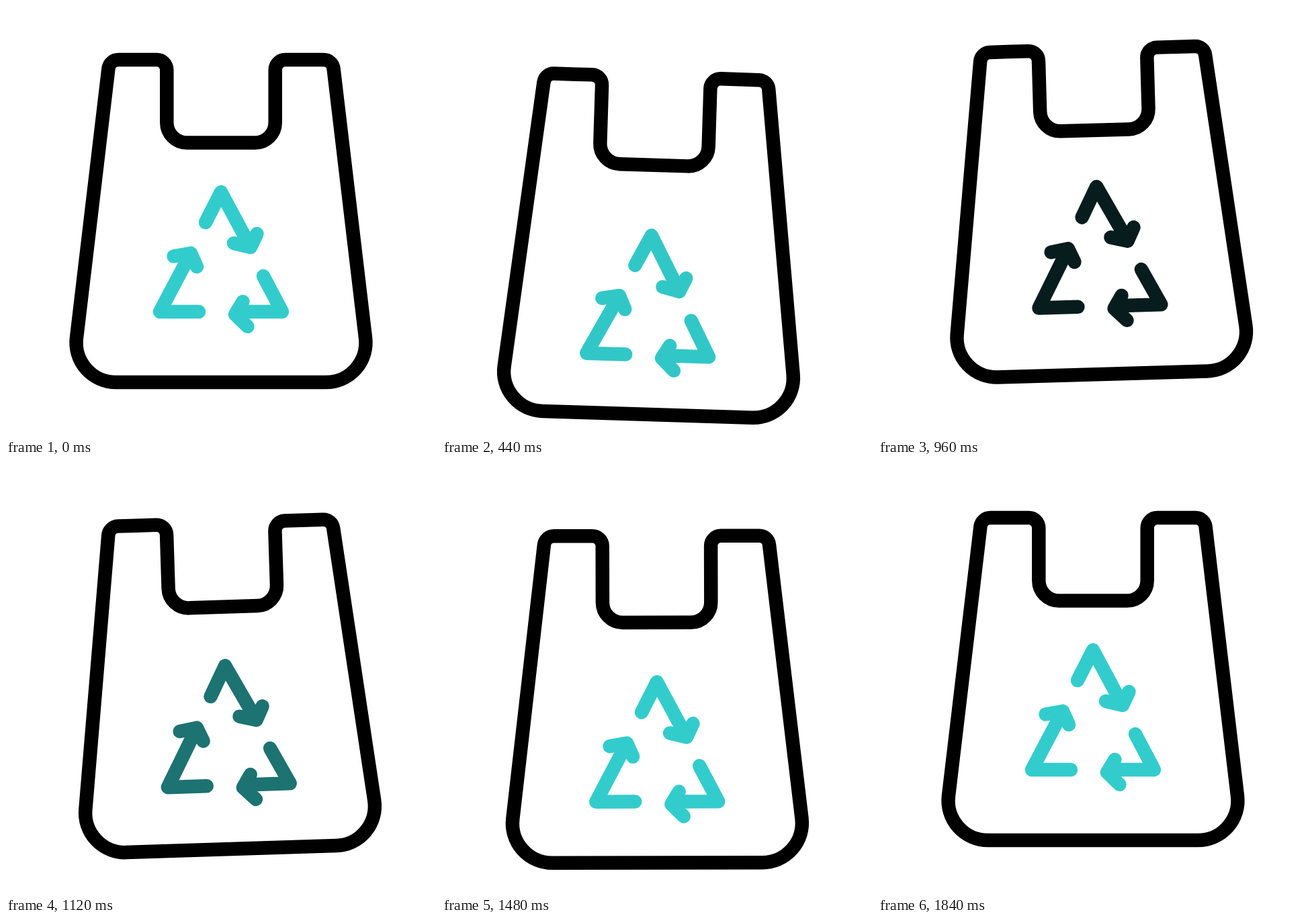
Recreate the animation shown at these times as an HTML page with a canvas. Size 640 by 640 pixels, loop 2000 ms.

```html
<!DOCTYPE html>
<html lang="en">
<head>
<meta charset="utf-8">
<title>Recyclable bag</title>
<style>
  html, body { margin: 0; width: 100%; height: 100%; overflow: hidden; background: #fff; }
  canvas { display: block; width: 100vw; height: 100vh; object-fit: contain; }
</style>
</head>
<body>
<canvas id="stage" width="640" height="640"></canvas>
<script>
const ctx = document.getElementById('stage').getContext('2d');
const LOOP = 2000, STEP = 40;
const PIVOT = { x: 320, y: 80 };

// Key times in ms
const BOUNCE = [80, 400, 840, 1360, 1840];
const SWAY = [80, 520, 1044, 1560];

// Eased value between keys, flat at every key
function track(t, times, values) {
  const last = times.length - 1;
  if (t <= times[0]) return values[0];
  if (t >= times[last]) return values[last];
  let i = 0;
  while (t >= times[i + 1]) i++;
  const u = (t - times[i]) / (times[i + 1] - times[i]);
  return values[i] + (values[i + 1] - values[i]) * u * u * (3 - 2 * u);
}

function pose(t) {
  return {
    drift: track(t, BOUNCE, [0, -0.8, -0.8, -0.7, 0]),
    drop: track(t, BOUNCE, [0, 26.5, -23, 32, 0]),
    handle: track(t, BOUNCE, [0, 8.3, -4.5, 6.5, 0]),
    base: track(t, BOUNCE, [0, 23.1, 3.2, 7.7, 0]),
    lean: track(t, BOUNCE, [0, 2.2, 1.3, 0, 0]),
    sign: track(t, BOUNCE, [0, 40.2, 5, 24.3, 0]),
    light: track(t, BOUNCE, [1, 1, 0, 1, 1]),
    angle: track(t, SWAY, [0, 1.97, -1.95, 0]) * Math.PI / 180
  };
}

function drawBag({ handle, base, lean }) {
  const mid = 203.5 + handle, low = 560 + base, foot = 494 + base;
  ctx.beginPath();
  ctx.moveTo(195, 80);
  ctx.arcTo(239.3, 80, 239.3, 120, 15);
  ctx.arcTo(239.3, mid, 320, mid, 30);
  ctx.arcTo(400.7, mid, 400.7, 120, 30);
  ctx.arcTo(400.7, 80, 445, 80, 15);
  ctx.arcTo(486, 80, 535 + lean, foot, 15);
  ctx.arcTo(542.8 + lean, low, 320, low, 59);
  ctx.arcTo(97.2 + lean, low, 105 + lean, foot, 59);
  ctx.arcTo(154, 80, 195, 80, 15);
  ctx.closePath();
  ctx.strokeStyle = '#000';
  ctx.stroke();
}

function line(...points) {
  points.forEach(([x, y], i) => i ? ctx.lineTo(x, y) : ctx.moveTo(x, y));
}

function drawSign(light) {
  const c = Math.round(204 * light);
  ctx.beginPath();
  line([297, 322], [320, 277], [364, 359]);
  line([339, 353], [364, 359], [373.5, 339]);
  line([287, 455], [229, 455], [275, 368]);
  line([249.5, 372.5], [275, 368], [284, 388]);
  line([383, 402], [411, 455], [345, 455]);
  line([352.5, 440], [341, 459], [359.5, 477]);
  ctx.strokeStyle = `rgb(${Math.round(c / 4)}, ${c}, ${c})`;
  ctx.stroke();
}

function draw(t) {
  const p = pose(t);
  ctx.fillStyle = '#fff';
  ctx.fillRect(0, 0, 640, 640);
  ctx.save();
  ctx.translate(PIVOT.x + p.drift, PIVOT.y + p.drop);
  ctx.rotate(p.angle);
  ctx.translate(-PIVOT.x, -PIVOT.y);
  ctx.lineWidth = 20.5;
  ctx.lineCap = ctx.lineJoin = 'round';
  drawBag(p);
  ctx.translate(0, p.sign);
  drawSign(p.light);
  ctx.restore();
}

const start = performance.now();
function tick() {
  const t = (performance.now() - start) % LOOP;
  draw(Math.floor(t / STEP) * STEP);
  requestAnimationFrame(tick);
}
tick();
</script>
</body>
</html>
```
